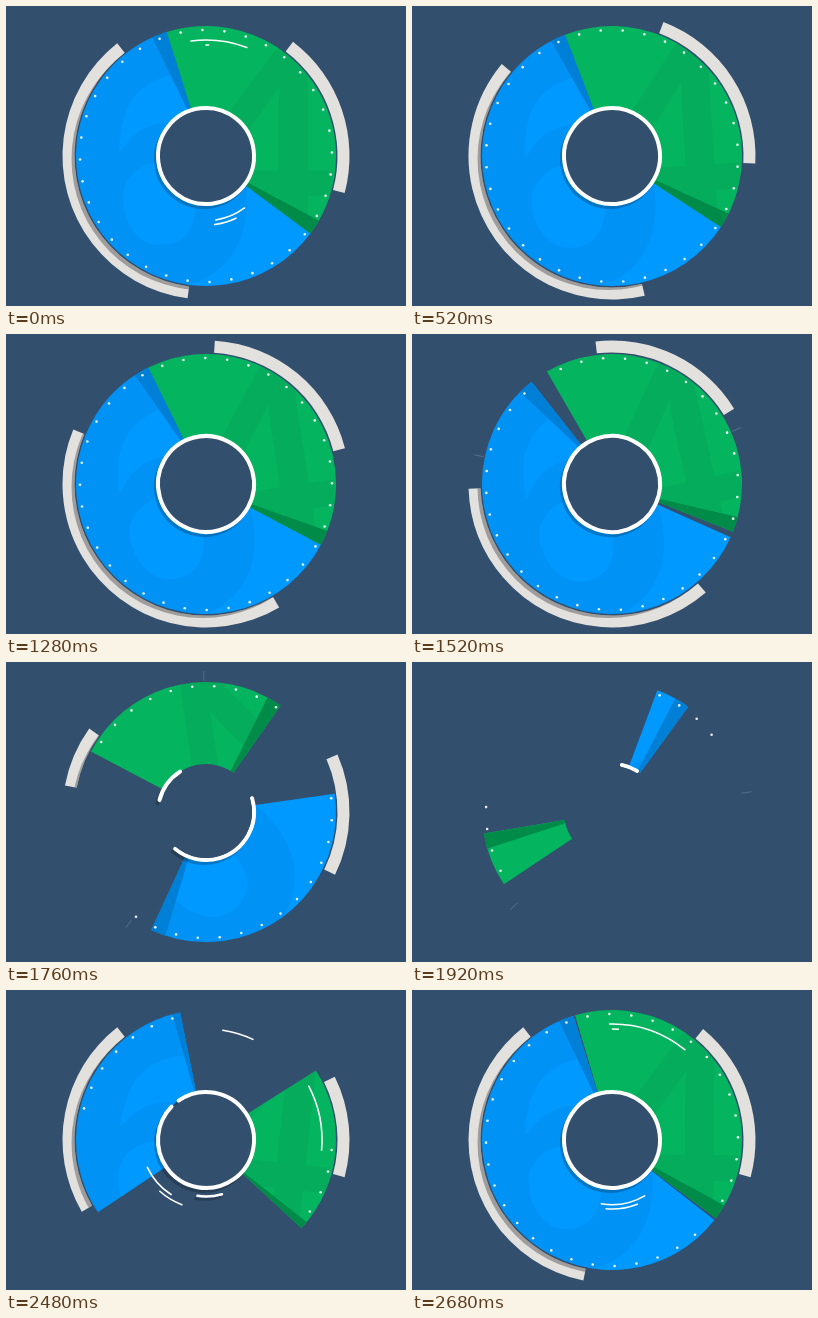
An HTML page with a canvas that plays this animation: 400 by 300 pixels, repeating every 2.72 s.

```html
<!DOCTYPE html>
<html>
<head>
<meta charset="utf-8">
<style>
  html, body { margin: 0; width: 400px; height: 300px; overflow: hidden; background: #334f6e; }
  canvas { display: block; }
</style>
</head>
<body>
<canvas id="stage" width="400" height="300"></canvas>
<script>
const ctx = document.getElementById('stage').getContext('2d');
const LOOP = 2720, LEAD = 560; // the loop opens LEAD ms after the wheel starts to build
const END = 2520;              // the stage is empty from here to the end of the loop
const OUTER = 130, INNER = 48, RING = 48, BAND = 137.5;
const BACK = '#334f6e';

// Angles are degrees clockwise from the top.
const rad = deg => (deg - 90) * Math.PI / 180;
const progress = (t, start, length) => Math.min(1, Math.max(0, (t - start) / length));
const easeInOut = x => x < .5 ? 4 * x ** 3 : 1 - 4 * (1 - x) ** 3;

// Everything turns slowly, then whirls away at the end.
const drift = t => Math.max(0, t - LEAD);
const whirl = t => 115 * progress(t, 1900, 620) ** 3.25;
const spin = t => 22 * (1 - progress(t, 0, LEAD)) ** 1.5 - .0068 * drift(t) - whirl(t);
const bandSpin = t => -.023 * drift(t) - 2.2 * whirl(t);

const grow = t => easeInOut(progress(t, 60, 515));
const bandGrow = t => 1 - (1 - progress(t, 180, 820)) ** 4.5;
const bandShrink = t => 1 - progress(t, 1929, 485) ** 2;

const sectors = [
  { from: 126.6, size: 215.8, color: '#0099ff', shade: '#007fd6',
    digit: '6', font: 'bold 350px "Open Sans", sans-serif', x: -48, y: 128,
    shrink: t => 1 - progress(t, 1980, 520) ** 2 },
  { from: -17.6, size: 144.2, color: '#04b45f', shade: '#008c48',
    digit: '4', font: 'bold 270px Lato, sans-serif', x: 55, y: 88,
    shrink: t => 1 - progress(t, 1970, 550) ** 2.5 }
];
const bands = [{ from: 178.8, size: 143 }, { from: 33, size: 72 }];
const ringParts = [{ from: 118, size: 211, fade: 400 }, { from: -31, size: 149, fade: 262 }];
const streaks = [
  { r: 116, from: 95, to: -14, lead: 0 },
  { r: 111, from: 25, to: 0, lead: 100 },
  { r: 64.7, from: 245, to: 137, lead: 0 },
  { r: 69, from: 222, to: 150, lead: 0 }
];
const swirl = { r: 56.5, from: -56, to: -200, lead: 275 };

function arc(r, a, b, width, color, cap = 'butt') {
  if (b - a < .4) return;
  ctx.beginPath();
  ctx.arc(0, 0, r, rad(a), rad(b));
  ctx.lineWidth = width;
  ctx.strokeStyle = color;
  ctx.lineCap = cap;
  ctx.stroke();
}

function disc(x, y, r, color) {
  ctx.beginPath();
  ctx.arc(x, y, r, 0, 7);
  ctx.fillStyle = color;
  ctx.fill();
}

// A white arc whose shadow falls only outwards.
function raisedArc(r, a, b, width) {
  ctx.save();
  ctx.translate(-2, 3);
  arc(r, a, b, width, 'rgba(0,0,0,.22)', 'round');
  ctx.restore();
  disc(0, 0, r - 2, BACK);
  arc(r, a, b, width, '#fff', 'round');
}

// Traces a piece of a ring between two radii.
function piece(inner, outer, a, b) {
  ctx.beginPath();
  ctx.arc(0, 0, outer, rad(a), rad(b));
  ctx.arc(0, 0, inner, rad(b), rad(a), true);
  ctx.closePath();
}

function drawBand(band, t) {
  const base = band.from + bandSpin(t);
  const a = base + band.size * (1 - bandGrow(t)), b = base + band.size * bandShrink(t);
  if (b - a < .4) return;
  ctx.save();
  piece(BAND - 6, BAND + 6, a, b);
  ctx.fillStyle = '#e3e1de';
  ctx.fill();
  ctx.clip();
  disc(-3.5, 3, OUTER + 1, 'rgba(0,0,0,.3)');
  ctx.restore();
}

// Sector limits before rotation.
const startOf = (s, t) => s.from + s.size * (1 - grow(t));
const endOf = (s, t) => s.from + s.size * s.shrink(t);

function drawSector(s, t) {
  const a = startOf(s, t) + spin(t), b = endOf(s, t) + spin(t);
  if (b - a < .4) return;
  ctx.save();
  piece(INNER, OUTER, a, b);
  ctx.fillStyle = s.color;
  ctx.fill();
  ctx.clip();

  ctx.save();
  ctx.rotate(spin(t) * Math.PI / 180);
  ctx.font = s.font;
  ctx.textAlign = 'center';
  ctx.fillStyle = 'rgba(0,0,0,.045)';
  ctx.fillText(s.digit, s.x, s.y);
  ctx.restore();

  ctx.beginPath();
  ctx.moveTo(25 * Math.cos(rad(b)), 25 * Math.sin(rad(b)));
  ctx.arc(0, 0, OUTER + 1, rad(b - 6.8 * grow(t)), rad(b));
  ctx.fillStyle = s.shade;
  ctx.fill();
  ctx.restore();
}

// Rivets follow the sector edges with a small delay.
function drawRivets(t) {
  for (let angle = -11.6; angle < 340; angle += 10) {
    const s = sectors[angle > sectors[0].from ? 0 : 1];
    if (angle < startOf(s, t - 40) || angle > endOf(s, t - 25)) continue;
    const d = rad(angle + spin(t));
    disc(126 * Math.cos(d), 126 * Math.sin(d), 1.3, 'rgba(255,255,255,.9)');
  }
}

// The head of a streak sets off first and the tail catches up with it.
function drawStreak({ r, from, to, lead }, t, draw) {
  const along = x => to + (from - to) * (1 - x) ** 2;
  const head = along(progress(t + lead, 255, 405)), tail = along(progress(t + lead, 430, 300));
  if (tail - head > .4) draw(r, head, tail);
}

function drawRing(t) {
  if (t < 2100) {
    const end = spin(t) - 52;
    raisedArc(RING, end - 360 * easeInOut(progress(t, 0, 400)), end, 4);
  } else for (const { from, size, fade } of ringParts) {
    const a = from + spin(t);
    raisedArc(RING, a, a + size * (1 - progress(t, 2100, fade) ** 2), 4);
  }
}

function drawSparks(t) {
  if (t < 2040) return;
  for (const from of [71, 286.6]) {
    const angle = from - 2.2 * whirl(t);
    arc(136, angle - .2, angle + .2001, 10, 'rgba(140,165,185,.35)');
  }
}

function draw(time) {
  const t = (time + LEAD) % LOOP;
  ctx.setTransform(1, 0, 0, 1, 0, 0);
  ctx.fillStyle = BACK;
  ctx.fillRect(0, 0, 400, 300);
  if (t >= END) return;
  ctx.translate(200, 150);

  for (const band of bands) drawBand(band, t);
  drawSparks(t);
  drawStreak(swirl, t, (r, a, b) => raisedArc(r, a, b, 2.5));
  for (const s of sectors) drawSector(s, t);
  drawRivets(t);
  for (const s of streaks) drawStreak(s, t, (r, a, b) => arc(r, a, b, 1.6, '#fff', 'round'));
  drawRing(t);
}

const began = performance.now();
function tick() {
  draw(performance.now() - began);
  requestAnimationFrame(tick);
}
tick();
</script>
</body>
</html>
```
